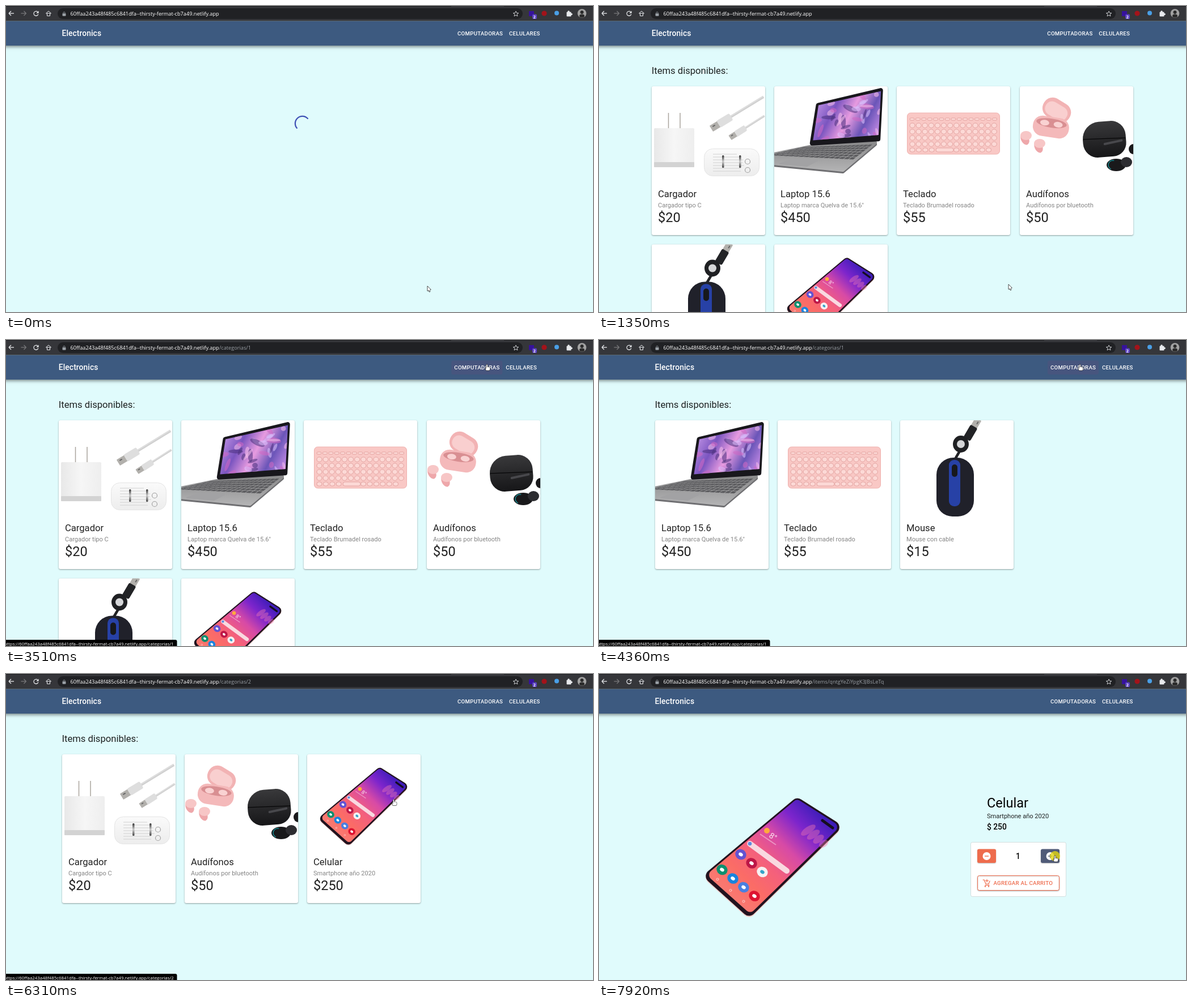
An HTML page with a canvas for the animation above (7.99 s loop, 1035 px wide and 541 px high).

```html
<!DOCTYPE html>
<html lang="es">
<head>
<meta charset="utf-8">
<title>Electronics</title>
<style>
html, body { margin: 0; width: 100%; height: 100%; overflow: hidden; background: #e0fbfc; }
canvas { display: block; }
</style>
</head>
<body>
<canvas id="stage" width="1035" height="541"></canvas>
<script>
const c = document.getElementById('stage').getContext('2d');
const LOOP = 7990, NAVY = '#3d5a80', ORANGE = '#ee6c4d', PAGE = '#e0fbfc';
const INK = 'rgba(0,0,0,.87)', TAU = Math.PI * 2;
const UI = '"Open Sans", sans-serif', ROBOTO = 'Roboto, sans-serif', ARIAL = '"Liberation Sans", Arial, sans-serif';
const HOST = '60ffaa243a48f485c6841dfa--thirsty-fermat-cb7a49.netlify.app';

// ---- drawing helpers ----
function text(s, x, y, size, color, family = ROBOTO, weight = 400, spacing = 0) {
  c.font = `${weight} ${size}px ${family}`;
  c.letterSpacing = spacing + 'px';
  c.fillStyle = color;
  c.fillText(s, x, y);
}
function paint(fill, stroke, width = 1) {
  if (fill) { c.fillStyle = fill; c.fill(); }
  if (stroke) { c.strokeStyle = stroke; c.lineWidth = width; c.stroke(); }
}
function box(x, y, w, h, fill, r = 0, stroke, width) {
  c.beginPath();
  c.roundRect(x, y, w, h, r);
  paint(fill, stroke, width);
}
function disc(x, y, rx, fill, ry = rx, turn = 0) {
  c.beginPath();
  c.ellipse(x, y, rx, ry, turn, 0, TAU);
  paint(fill);
}
function ring(x, y, r, color, width, from = 0, to = TAU) {
  c.beginPath();
  c.arc(x, y, r, from, to);
  paint(null, color, width);
}
function line(x1, y1, x2, y2, color, width = 1, cap = 'butt') {
  c.beginPath();
  c.moveTo(x1, y1);
  c.lineTo(x2, y2);
  c.lineCap = cap;
  paint(null, color, width);
}
function poly(points, fill, r = 0, stroke, width) {
  const next = i => points[(i + 1) % points.length], [a, z] = [points[0], points.at(-1)];
  c.beginPath();
  c.moveTo((a[0] + z[0]) / 2, (a[1] + z[1]) / 2);
  points.forEach((p, i) => c.arcTo(...p, ...next(i), r));
  c.closePath();
  paint(fill, stroke, width);
}
const mix = (a, b, k) => a + (b - a) * k;
// Point at (u, v) inside a quad listed clockwise from its top left
const at = ([a, b, d, e], u, v) => [0, 1].map(k => mix(mix(a[k], b[k], u), mix(e[k], d[k], u), v));
const part = (quad, u, v, u2, v2) => [at(quad, u, v), at(quad, u2, v), at(quad, u2, v2), at(quad, u, v2)];
function blend(x1, y1, x2, y2, ...colors) {
  const g = c.createLinearGradient(x1, y1, x2, y2);
  colors.forEach((color, i) => g.addColorStop(i / (colors.length - 1), color));
  return g;
}
function shadow(blur, y, alpha, draw) {
  c.save();
  c.shadowColor = `rgba(0,0,0,${alpha})`;
  c.shadowBlur = blur;
  c.shadowOffsetY = y;
  draw();
  c.restore();
}
function placed(x, y, turn, scale, draw) {
  c.save();
  c.translate(x, y);
  c.rotate(turn);
  c.scale(scale, scale);
  draw();
  c.restore();
}
function random(seed) {
  const s = Math.sin(seed * 127.1) * 43758.5;
  return s - Math.floor(s);
}

// ---- product pictures, relative to the card corner ----
function plug(x, y, turn, scale, sleeve, cable, length) {
  placed(x, y, turn, scale, () => {
    line(30, 0, length, 0, cable, 4.5);
    line(30, -1, length, -1, sleeve, 2);
    box(0, -6, 18, 12, '#b2b0ac', 1);
    line(4, -2, 9, -2, '#666', 2);
    box(15, -7, 26, 14, sleeve, 3);
  });
}
function charger() {
  for (const x of [29.5, 50]) line(x, 47, x, 75, '#aaa49c', 1.5);
  box(4, 74, 71, 69, blend(4, 0, 75, 0, '#e8e8e8', '#f6f6f6', '#eee'), 2);
  box(4, 134, 71, 9, '#d3d3d3', 1);
  plug(105, 75, -.55, 1, '#dedede', '#d0d0d0', 108);
  plug(138, 91, -.57, .8, '#dedede', '#d0d0d0', 90);
  box(92.5, 110.5, 97, 48, blend(0, 110, 0, 159, '#fafafa', '#ededed'), 15, '#e4e4e4');
  for (let i = 0; i < 7; i++) line(108, 120 + i * 5, 150 + 14 * random(i), 120 + i * 5, '#ccc', .9);
  for (const x of [124, 154]) box(x, 122, 3.5, 22, blend(0, 122, 0, 144, '#333', '#ccc', '#444'), 1.5);
  for (const y of [133, 148]) ring(169, y, 4.5, '#a2a2a2', 1.2);
}
function laptop() {
  const lid = [[74, 30], [192, 2], [187, 97], [62, 105]];
  const deck = [[62, 104], [187, 96], [122, 151], [-75, 132]];
  placed(0, 3, 0, 1, () => poly(deck, '#6f6f72', 3));
  poly(deck, blend(60, 100, 60, 152, '#8b8b8c', '#b5b5b6'), 3);
  for (let row = 0; row < 6; row++)
    for (let i = 0; i < 17; i++) {
      const u = .06 + i * .053, v = .12 + row * .085;
      poly(part(deck, u, v, u + .045, v + .068), '#5b5b5e');
    }
  poly(part(deck, .38, .7, .65, .95), '#a2a2a4', 1);
  poly(lid, '#18171c', 4);
  poly(part(lid, .04, .06, .97, .88), blend(75, 35, 180, 90, '#b78ae0', '#7b55c0', '#e79be0', '#6a55b8', '#c58be6'));
  c.save();
  c.clip();
  for (let i = 0; i < 40; i++)
    disc(70 + 120 * random(i), 10 + 85 * random(i + 50), 4 + 12 * random(i + 90),
      ['#f1b8ea99', '#4a307d88', '#dcc4ff88', '#d268c488'][i % 4], 2 + 3 * random(i + 7), TAU * random(i + 20));
  c.restore();
}
function keyboard() {
  box(18.5, 47, 163, 73, '#f9c8c5', 6, '#eeb1ae');
  const key = (x, y, w, h) => box(x, y, w, h, '#fcd9d6', Math.min(w, h) / 2, '#dc9896', .8);
  for (let i = 0; i < 15; i++) key(23 + i * 10.4, 56, 8, 4);
  for (let row = 0; row < 4; row++)
    for (let i = 0; i < 14; i++) key(23 + i * 11.1, 65 + row * 11, 9, 8.3);
  for (let i = 0; i < 10; i++) key(23 + i * 11.4 + (i > 3 ? 32 : 0), 109, 9, 7);
  key(69, 109, 31, 7);
}
function earbuds() {
  placed(64, 44, .55, 1, () => {
    box(-26, -20, 52, 36, '#f2b3b4', 17);
    box(-21, -13, 42, 25, '#f9cfcf', 12);
  });
  placed(55, 71, .15, 1, () => {
    box(-32, -17, 64, 36, '#f4b9ba', 17);
    disc(0, -6, 27, '#d98f92', 8);
    for (const x of [-12, 12]) disc(x, -5, 8, '#f9d2d2', 5);
  });
  for (const [x, y] of [[9, 87], [33, 101]]) {
    disc(x, y + 6, 7, '#eea7aa', 11, -.4);
    disc(x + 2, y, 10, '#f7c6c6', 8);
  }
  placed(149, 93, -.08, 1, () => {
    box(-38, -31, 76, 63, blend(0, -31, 0, 32, '#39393b', '#161618'), [30, 26, 24, 26]);
    line(-37, -2, 37, 1, '#060607', 1.3);
    line(0, 9, 30, 5, '#48484c', 4, 'round');
  });
  disc(170, 139, 17, '#19191b', 11);
  disc(188, 134, 10, '#2c2c30', 9);
  ring(164, 139, 8, '#178f96', 1.4, 2, 5);
  disc(200, 111, 8, '#19191b', 9);
}
function mouse() {
  plug(138, -2, 2.1, 1, '#222326', '#222326', 84);
  disc(107, 42, 14, '#1f2023', 15);
  disc(107, 42, 7, '#d5d6d8');
  box(64, 66, 66, 104, '#20212a', [30, 30, 28, 28]);
  box(86, 70, 20, 82, '#2741a6', 9);
  box(91, 78, 10, 22, '#17181c', 5);
}
function phoneAt(x, y, scale) {
  const body = [[165, -2], [247, 50], [81, 213], [-2, 138]];
  placed(x, y, 0, scale, () => {
    placed(0, 2, 0, 1, () => poly(body, '#f0c9c5', 12));
    poly(body, '#21131f', 12);
    poly(part(body, .03, .015, .96, .97), blend(200, 15, 42, 173, '#3a1cb8', '#7d25cc', '#d74aa6', '#f4607c', '#fb6c66', '#f97a72'), 9);
    for (let i = 0; i < 4; i++) disc(185 + 9 * i, 57 + 8 * i, 15 - 2 * i, '#f27ab066', 6, -.6);
    line(210, 40, 228, 53, '#150d20', 5, 'round');
    disc(112, 58, 5, '#ffab3c');
    placed(116, 67, .6, 1, () => text('8°', 0, 2, 14, '#ffffffdd'));
    line(100, 64, 128, 83, '#ffffff66', 2);
    line(82, 81, 147, 129, '#f9d9e0', 10, 'round');
    disc(82, 81, 3.3, '#5b8de0');
    const iconRow = (x0, y0, colors) => colors.forEach((color, i) => {
      disc(x0 + i * 19, y0 + i * 15.5, 10, color, 9, .6);
      disc(x0 + i * 19, y0 + i * 15.5, 4, color == '#f6f1f2' ? '#35a3c8' : '#fff', 3, .6);
    });
    iconRow(66, 100, ['#6353d2', '#bd1747', '#f6f1f2']);
    iconRow(33, 127, ['#0d9070', '#1b83de', '#4a7fe0', '#de1432']);
    for (let i = 0; i < 3; i++) ring(25 + i * 23, 144 + i * 19.5, 2, '#ffffff99', 1);
  });
}

const ITEMS = [
  [charger, 'Cargador', 'Cargador tipo C', '$20'],
  [laptop, 'Laptop 15.6', 'Laptop marca Quelva de 15.6"', '$450'],
  [keyboard, 'Teclado', 'Teclado Brumadel rosado', '$55'],
  [earbuds, 'Audífonos', 'Audífonos por bluetooth', '$50'],
  [mouse, 'Mouse', 'Mouse con cable', '$15'],
  [() => phoneAt(20, 23.5, .652), 'Celular', 'Smartphone año 2020', '$250']
];
const pick = (...pictures) => pictures.map(i => ITEMS[i]);
const COMPUTERS = pick(1, 2, 4), PHONES = pick(0, 3, 5);

// ---- page parts ----
function card(x, y, [picture, name, note, price], loaded, family) {
  shadow(2.5, 1, .38, () => box(x, y, 200, 263, '#fff', 3));
  placed(x, y, 0, 1, () => {
    if (loaded) {
      c.save();
      c.beginPath();
      c.rect(0, 0, 200, 176);
      c.clip();
      picture();
      c.restore();
    }
    text(name, 11, 196, 16.6, INK, family);
    text(family == ARIAL ? note.replace('"', "''") : note, 11, 214, 11.06, '#858585', family);
    text(price, 11, 240, 23.5, INK, family);
  });
}
function list(items, left, t) {
  const family = t >= 1150 ? ROBOTO : ARIAL;
  text('Items disponibles:', left, 120, 16.6, INK, family);
  items.forEach((item, i) =>
    card(Math.round(left + i % 4 * 216.3), 142 + (i >> 2) * 279.5, item, t >= 1250, family));
}
const easeInOut = x => x * x * (3 - 2 * x);
function spinner(ms) {
  const p = ms / 1400 % 1, e = easeInOut(p * 2 % 1), unit = TAU / 126.9;
  const length = p < .5 ? 1 + 99 * e : 100;
  const start = p < .5 ? 15 * e : 15 + 110 * e;
  const from = p * TAU + start * unit;
  c.lineCap = 'butt';
  ring(522.6, 207.6, 12.7, '#3f51b5', 2.26, from, from + Math.min(length, 126.9 - start) * unit);
}
function stepButton(x, color, plus) {
  shadow(2, 1, .25, () => box(x, 309.5, 33, 24.5, color, 3));
  placed(x + 16.5, 322, 0, 1, () => {
    disc(0, 0, 7, '#fff');
    line(-3.5, 0, 3.5, 0, color, 1.4);
    if (plus) line(0, -3.5, 0, 3.5, color, 1.4);
  });
}
function cart(x, y) {
  placed(x, y, 0, 1, () => {
    const stroke = (...p) => line(...p, ORANGE, 1.2, 'round');
    stroke(0, 1, 2, 1);
    stroke(2, 1, 5, 8);
    stroke(5, 8, 10, 8);
    stroke(10, 8, 12, 3);
    stroke(4, 10.3, 11, 10.3);
    stroke(7, 0, 7, 5);
    stroke(4.5, 2.5, 9.5, 2.5);
    for (const wheel of [4, 10]) disc(wheel, 12.5, 1.2, ORANGE);
  });
}
function detail(t) {
  phoneAt(184, 219, 1);
  text('Celular', 684, 236, 23.5, '#000');
  text('Smartphone año 2020', 684, 254.5, 11.06, INK);
  text('$ 250', 684, 275, 13.8, '#000', ROBOTO, 500);
  box(655.5, 297.5, 168, 96, '#fff', 3, 'rgba(0,0,0,.12)');
  stepButton(667, ORANGE, false);
  stepButton(779, t > 7750 ? '#505b78' : NAVY, true);
  text('1', 735, 327, 13.8, '#000', ROBOTO, 500);
  shadow(2, 1, .25, () => box(667.5, 356.5, 144, 26, '#fff', 3, ORANGE));
  cart(677, 363);
  text('AGREGAR AL CARRITO', 695.5, 372.6, 9.67, ORANGE, ROBOTO, 500, .276);
  if (t >= 7850) disc(804, 322, 9, 'rgba(225,212,15,.8)');
}
function arrow(x, dir, color) {
  line(x - 4.5, 13, x + 4.5, 13, color, 1.3);
  for (const dy of [-4, 4]) line(x + 4.5 * dir, 13, x + .5 * dir, 13 + dy, color, 1.3);
}
function browser(path) {
  const W = '#e8eaed', GRAY = '#9aa0a6';
  box(0, 0, 1035, 26.5, '#35363a');
  box(0, 0, 785, 1, '#1c1d20');
  box(878, 0, 157, 1, '#1c1d20');
  box(91, 4, 820, 19, '#202124', 9.5);
  arrow(9.5, -1, W);
  arrow(31, 1, '#77787b');
  ring(53, 13.3, 4, W, 1.3, .3, 5.4);
  poly([[57.6, 8.5], [57.6, 12.7], [53.4, 12.7]], W);
  box(72.5, 12.5, 5, 5, null, 0, W);
  poly([[70.5, 13], [75, 9], [79.5, 13]], '#35363a', 0, W);
  box(99.5, 13, 6, 4.8, GRAY, 1);
  ring(102.5, 12.5, 1.8, GRAY, 1, Math.PI, TAU);
  text(HOST, 113.5, 17, 9.18, '#fff', UI);
  text(path, 376, 17, 9.18, GRAY, UI);
  const star = Array.from({ length: 10 }, (_, i) => {
    const r = i % 2 ? 2.2 : 5, a = i * TAU / 10 - TAU / 4;
    return [899 + r * Math.cos(a), 14 + r * Math.sin(a)];
  });
  poly(star, null, 0, '#c8cacd');
  box(922, 9, 9, 9, '#36129c');
  box(928, 14.5, 8, 8.5, '#5b41c2', 2);
  text('2', 929.8, 21.5, 7, '#fff', UI, 700);
  disc(949, 13, 4.6, '#a3131a');
  disc(971, 12.5, 4, '#4a9fe6');
  box(988.5, 10.5, 8, 8, W, 1);
  disc(992, 10, 1.8, W);
  disc(997, 14.5, 1.8, W);
  disc(1015.5, 13, 7.8, '#a2a2a2');
  disc(1015.5, 11, 3, '#2b2b2b');
  disc(1015.5, 17.5, 4.5, '#2b2b2b', 3);
}
const LINKS = [['COMPUTADORAS', 796, 80], ['CELULARES', 887, 55]];
function navbar(shift, hovered) {
  shadow(6, 2, .5, () => box(-9, 26.5, 1053, 43.5, NAVY));
  text('Electronics', 98.5 + shift, 53, 13.8, '#fff', ROBOTO, 500, .1);
  for (const link of LINKS) {
    const [label, x, width] = link;
    if (link == hovered) box(x - 5 + shift, 36.5, width + 10, 24.5, 'rgba(245,0,87,.05)', 3);
    text(label, x + shift, 52, 9.67, '#fff', ROBOTO, 500, .276);
  }
}
function statusBar(t) {
  if (t < 2900 || t >= 6720) return;
  const category = t > 3150 && t < 4520 ? 1 : 2;
  c.globalAlpha = Math.min(1, (6720 - t) / 250);
  box(-5, 530, 306.5, 16, '#000', 3);
  text(`https://${HOST}/categorias/${category}`, -3.5, 540, 7.87, '#fff', UI);
  c.globalAlpha = 1;
}

// ---- pointer moves: begin, end, target x, target y ----
const MOVES = [
  [300, 820, 722, 492], [2020, 2770, 936, 60], [2830, 3400, 848, 43],
  [4360, 4670, 906, 45], [5640, 6330, 683, 222], [7250, 7850, 804, 321]
];
function pointer(t) {
  return MOVES.reduce(([x, y], [begin, end, tx, ty]) => {
    const e = easeInOut(Math.min(1, Math.max(0, (t - begin) / (end - begin))));
    return [mix(x, tx, e), mix(y, ty, e)];
  }, [743, 495]);
}
function drawPointer(x, y, hand) {
  placed(x, y, 0, 1, () => {
    if (hand) {
      box(-2.5, 4.5, 8, 6.5, '#fff', 2, '#222', .7);
      box(-1.2, 0, 2.4, 8, '#fff', 1.2, '#222', .7);
      box(-.8, 5, 5.6, 5, '#fff', 1);
    } else {
      line(2.5, 6, 4.3, 10.5, '#222', 2.6);
      poly([[0, 0], [0, 9], [6.3, 6.4]], '#fff', 0, '#222', .8);
      line(2.5, 5.5, 4.2, 9.8, '#fff', 1.2);
    }
  });
}

function draw(t) {
  const shift = t >= 890 && t < 3600 ? -5.7 : 0, left = 98.5 + shift;
  const [x, y] = pointer(t);
  const hovered = y > 36 && y < 61 && LINKS.find(([, lx, w]) => Math.abs(x - shift - lx - w / 2) < w / 2 + 5);
  const onCard = t > 5640 && t < 6390 && x < 732 && y > 142;
  const path = t < 3500 ? '' : t < 4840 ? '/categorias/1' : t < 6460 ? '/categorias/2' : '/items/qntgYeZiYpgK3JBsLeTq';

  box(0, 0, 1035, 541, PAGE);
  if (t < 890) spinner(t + 420);
  else if (t < 3600) list(ITEMS, left, t);
  else if (t < 5180) list(COMPUTERS, left, t);
  else if (t < 6390) list(PHONES, left, t);
  else if (t < 6720) spinner(t - 6405 + 1400);
  else detail(t);
  navbar(shift, hovered);
  browser(path);
  statusBar(t);
  drawPointer(x, y, hovered || onCard || t > 7780);
}
function tick() {
  draw(performance.now() % LOOP);
  requestAnimationFrame(tick);
}
tick();
</script>
</body>
</html>
```
